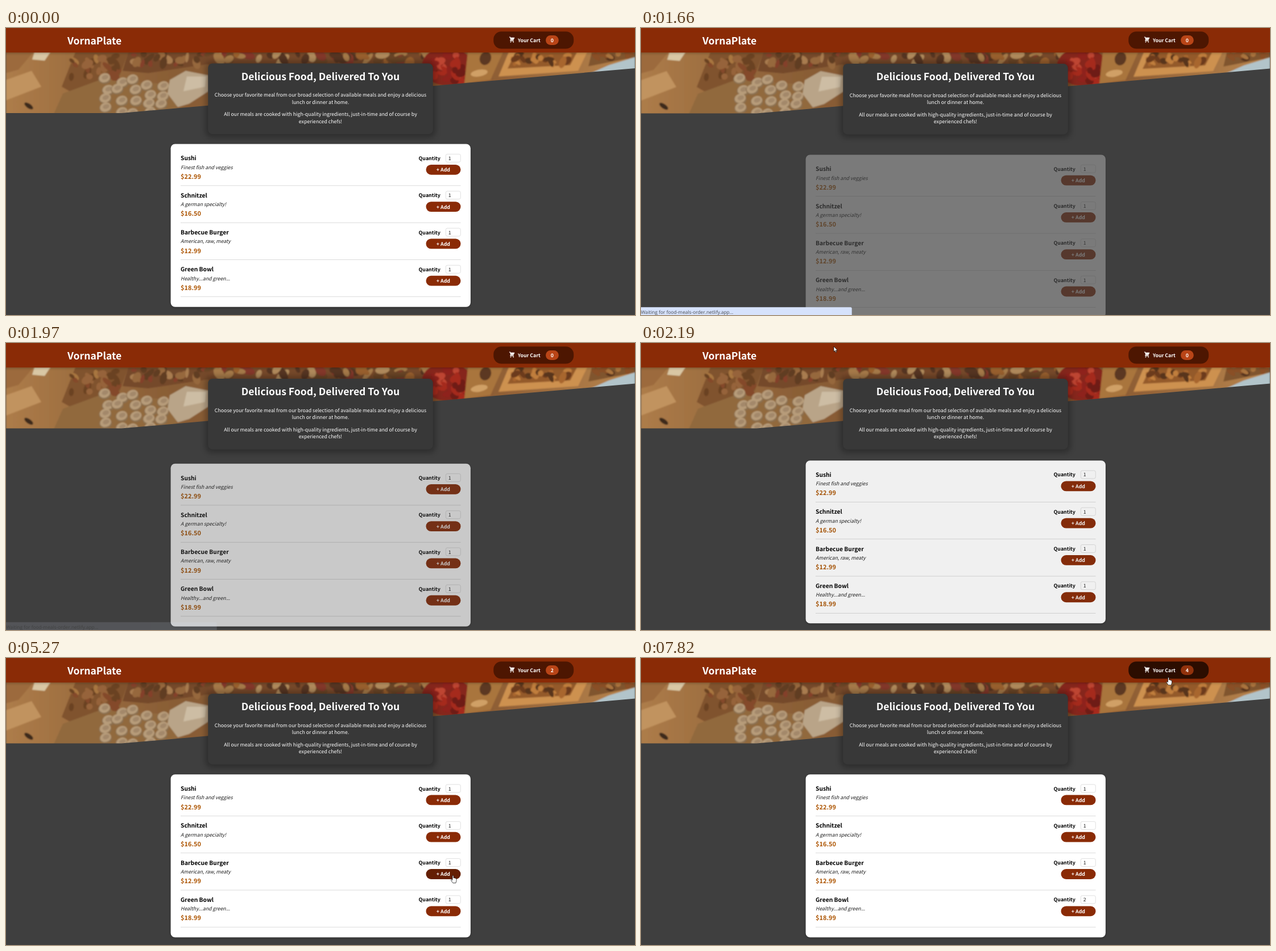
These frames come from a looping animation (1106x506 px, 8000 ms). An HTML page:

```html
<!DOCTYPE html>
<html lang="en">
<head>
<meta charset="utf-8">
<title>Meal order</title>
<style>
  html, body { margin: 0; width: 100%; height: 100%; overflow: hidden; background: #3f3f3f; }
  svg { display: block; width: 1106px; height: 506px; }
  text {
    font: 8.78px "Noto Sans CJK JP", "Noto Sans JP", "Noto Sans CJK SC", "Noto Sans CJK", sans-serif;
    text-rendering: geometricPrecision;
    white-space: pre;
  }
  .bold { font-weight: 700; }
  .big { font-weight: 700; font-size: 17.56px; }
  .name { font-weight: 700; font-size: 10.27px; }
  .note { font-style: italic; }
  .price { font-weight: 700; font-size: 10.97px; fill: #ad5502; }
  .mid { text-anchor: middle; }
  .light { fill: #fff; }
  .status { font: 8.35px "Open Sans", "Noto Sans", sans-serif; fill: #474a50; }
</style>
</head>
<body>
<svg id="stage" viewBox="0 0 1106 506"></svg>
<script>
const LOOP = 8000;
const RELOAD = 1490;
const $ = id => document.getElementById(id);
const set = (id, attrs) => { for (const k in attrs) $(id).setAttribute(k, attrs[k]); };
const show = (id, on) => $(id).setAttribute('visibility', on ? 'visible' : 'hidden');

const text = (x, y, cls, str, extra = '') => `<text x="${x}" y="${y}" class="${cls}" ${extra}>${str}</text>`;
const rect = (x, y, w, h, r, fill, extra = '') =>
  `<rect x="${x}" y="${y}" width="${w}" height="${h}" rx="${r}" fill="${fill}" ${extra}/>`;
const oval = (x, y, rx, ry, fill, turn = 0) =>
  `<ellipse cx="${x}" cy="${y}" rx="${rx}" ry="${ry}" fill="${fill}" transform="rotate(${turn} ${x} ${y})"/>`;
const poly = (points, fill) => `<polygon points="${points}" fill="${fill}"/>`;

// Buffet photo as soft flat shapes.
function buffet() {
  let seed = 7;
  const rnd = () => (seed = seed * 16807 % 2147483647) / 2147483647;
  const scatter = (n, x, y, w, h, r, colors) => Array.from({ length: n }, () =>
    oval(x + rnd() * w, y + rnd() * h, r * (.6 + rnd()), r * (.4 + rnd() * .6),
      colors[Math.floor(rnd() * colors.length)], rnd() * 180)).join('');
  const cup = (x, y) => oval(x, y + 2, 11, 9, '#8b6f50') + oval(x, y, 10, 8, '#b79c7a', -20)
    + oval(x + 1, y - 1, 6, 4, '#a3886a', -20);
  return rect(0, 40, 1106, 115, 0, 'url(#wood)')
    + poly('0,43 48,43 22,74 0,80', '#9c6b3e')
    + poly('0,92 45,76 62,104 0,128', '#c1935f')
    + poly('50,43 78,43 68,58 46,56', '#d9c7a4')
    + poly('122,43 215,43 200,84 112,112 98,104', '#80522d')
    + scatter(22, 115, 48, 85, 42, 8, ['#96643a', '#a8763f', '#6b4224', '#84492a'])
    + poly('215,43 356,43 356,64 250,80 205,76', '#75482a')
    + scatter(24, 220, 45, 130, 20, 7, ['#84402a', '#a87c50', '#603c24', '#96673c'])
    + poly('100,116 165,92 300,100 300,152 84,152', '#91693e')
    + Array.from({ length: 20 }, (_, i) =>
        cup(168 + i % 5 * 25 + rnd() * 12, 84 + Math.floor(i / 5) * 18 + i % 5 * 3 + rnd() * 9)).join('')
    + poly('288,92 316,76 356,84 356,112 322,134 302,140 284,116', '#b9a488')
    + poly('318,86 352,86 350,104 312,112', '#cdbda4')
    + oval(40, 138, 9, 4, '#3d2a1c', 35)
    + rect(356, 43, 394, 24, 0, '#77492a')
    + scatter(50, 356, 44, 394, 18, 9, ['#a67a4a', '#84392a', '#563622', '#b08a5c', '#6a4428', '#99602f'])
    + oval(775, 68, 44, 34, '#86261a')
    + scatter(26, 750, 48, 52, 48, 8, ['#a52a1e', '#8e241a', '#bd4431', '#6e1c14'])
    + poly('812,43 874,43 852,92 806,98', '#a9743c')
    + oval(843, 54, 10, 12, '#5c3820', 20) + oval(832, 80, 15, 6, '#d0a066', -10)
    + poly('884,43 1022,43 1006,76 866,86', '#cd9150')
    + poly('896,43 1004,43 992,66 882,72', '#945a2a')
    + scatter(24, 892, 47, 98, 17, 7, ['#c07e3c', '#6c3a1e', '#a8662f', '#58341e'])
    + poly('1030,43 1106,43 1106,52 1024,68', '#80542e')
    + scatter(9, 1035, 45, 65, 8, 6, ['#aa733c', '#8a4f28', '#55331e'])
    + poly('1060,66 1106,52 1106,78 1020,84', '#b2c4ca');
}

const menu = [
  ['Sushi', 'Finest fish and veggies', '$22.99'],
  ['Schnitzel', 'A german specialty!', '$16.50'],
  ['Barbecue Burger', 'American, raw, meaty', '$12.99'],
  ['Green Bowl', 'Healthy...and green...', '$18.99'],
];
const rowY = i => i * 65.3;

const row = ([name, note, price], i) => `<g transform="translate(0 ${rowY(i)})">
  ${text(307, 234.1, 'name', name)}
  ${text(307, 249.4, 'note', note, 'fill="#1c1c1c"')}
  ${text(307, 266.5, 'price', price)}
  ${rect(307, 278.2, 492.5, .6, 0, '#c4c4c4')}
  ${text(725.6, 233.5, 'bold', 'Quantity')}
  ${rect(773.3, 223, 26, 14, 2.7, '#fff', `id="field${i}" stroke="#ccc" stroke-width=".6"`)}
  ${text(777.8, 233.5, '', '1', `id="qty${i}" fill="#222"`)}
  <g id="spin${i}">${rect(789.5, 224.5, 8.4, 11, 0, '#ececec')}${rect(789.5, 224.5, 8.4, 5.5, 0, '#d2d2d2')}
    <path d="M791.7 228.6l2-2 2 2zM791.7 232l2 2 2-2z" fill="#555"/></g>
  ${rect(738.5, 241.5, 61, 17.8, 8.9, '#8a2b06', `id="add${i}"`)}
  ${text(768.9, 253.9, 'bold light mid', '+ Add')}</g>`;

$('stage').innerHTML = `
<defs>
  <linearGradient id="wood">
    <stop offset="0" stop-color="#ad7c49"/><stop offset=".25" stop-color="#8a5e36"/>
    <stop offset=".7" stop-color="#80502c"/><stop offset="1" stop-color="#b9864e"/>
  </linearGradient>
  <clipPath id="slant"><path d="M0 40H1106V71.6L203 150.6H0Z"/></clipPath>
  <filter id="soft"><feGaussianBlur stdDeviation="1.3"/></filter>
  <filter id="glow" x="-20%" y="-40%" width="140%" height="180%"><feGaussianBlur stdDeviation="4.9"/></filter>
  <filter id="shade" x="-5%" y="-50%" width="110%" height="200%"><feGaussianBlur stdDeviation="2.2"/></filter>
</defs>
<rect width="1106" height="506" fill="#3f3f3f"/>
<g id="page">
  <g clip-path="url(#slant)"><g filter="url(#soft)">${buffet()}</g></g>
  ${rect(350, 58, 406, 136, 12, '#000', 'opacity=".25" filter="url(#glow)"')}
  ${rect(355.3, 63, 395.4, 124.6, 7.7, '#383838')}
  ${text(553, 92.2, 'big light mid', 'Delicious Food, Delivered To You')}
  ${text(553, 121.9, 'light mid', 'Choose your favorite meal from our broad selection of available meals and enjoy a delicious')}
  ${text(553, 134.3, 'light mid', 'lunch or dinner at home.')}
  ${text(553, 155.8, 'light mid', 'All our meals are cooked with high-quality ingredients, just-in-time and of course by')}
  ${text(553, 168.2, 'light mid', 'experienced chefs!')}
  <g id="list">
    ${rect(289.6, 206.5, 527.3, 287, 7.7, '#000', 'opacity=".25" filter="url(#shade)"')}
    ${rect(289.6, 205.2, 527.3, 287.2, 7.7, '#fff')}
    ${menu.map(row).join('')}
    ${rect(782.8, 420.8, .6, 10, 0, '#111', 'id="caret"')}
  </g>
</g>
${rect(-10, 2, 1126, 42.5, 0, '#000', 'opacity=".25" filter="url(#shade)"')}
${rect(0, 0, 1106, 43.2, 0, '#8a2b06')}
${text(108, 28.9, 'big light', 'VornaPlate')}
<g id="cart">
  ${rect(857.2, 6.3, 141, 30.1, 13.7, '#4d1601', 'id="cartBack"')}
  <path transform="translate(883.6 14.9) scale(.593)" fill="#fff" d="M3 1a1 1 0 000 2h1.22l1.673 6.694-.893.892C3.74 11.846 4.632 14 6.414 14H15a1 1 0 000-2H6.414l1-1H14a1 1 0 00.894-.553l3-6A1 1 0 0017 3H6.28l-.31-1.243A1 1 0 005 1H3zM16 16.5a1.5 1.5 0 11-3 0 1.5 1.5 0 013 0zM6.5 18a1.5 1.5 0 100-3 1.5 1.5 0 000 3z"/>
  ${text(899.9, 24.7, 'bold light', 'Your Cart')}
  ${rect(949, 13, 22.8, 16.9, 8.45, '#b94517', 'id="badge"')}
  ${text(960.4, 24.7, 'bold light mid', '0', 'id="count"')}
</g>
<g id="status">
  <path d="M0 492.3H368.5Q370.7 492.3 370.7 494.5V506H0Z" fill="#d6e2fc"/>
  ${text(0, 503.7, 'status', 'Waiting for food-meals-order.netlify.app...')}
</g>
<g id="cursor" fill="#fff" stroke="#000" stroke-width=".7" stroke-linejoin="round">
  <path id="arrow" d="M0 0V9.3L2.1 7.4 3.5 10.7 5 10 3.6 6.9H6.5Z"/>
  <path id="hand" d="M-1 1Q0-.7 1 1V4.6Q2.2 4 2.8 5 4 4.6 4.5 5.6 6 5.2 6 7V9.5L4.9 13.7H-.2L-3.2 9.4Q-4 7.4-2.4 7.6L-1 8.8Z"/>
</g>`;

// CSS ease-out, cubic-bezier(0, 0, .58, 1).
function easeOut(x) {
  let lo = 0, hi = 1;
  for (let i = 0; i < 20; i++) {
    const s = (lo + hi) / 2;
    if (1.74 * (1 - s) * s * s + s ** 3 < x) lo = s; else hi = s;
  }
  return lo * lo * (3 - 2 * lo);
}

// Keys are [time, ...values]; each segment eases out.
function track(keys, t) {
  if (t <= keys[0][0]) return keys[0].slice(1);
  const i = keys.findIndex(k => k[0] > t);
  if (i < 0) return keys.at(-1).slice(1);
  const a = keys[i - 1], b = keys[i], p = easeOut((t - a[0]) / (b[0] - a[0]));
  return a.slice(1).map((v, j) => v + (b[j + 1] - v) * p);
}

const bump = [[0, 1], [30, .9], [90, 1.1], [150, 1.15], [300, 1]];
const orders = [[3636, 1], [5268, 2], [7028, 4]];
const pointer = [
  [2200, 339, 6], [2280, 400, 47], [2910, 782, 256], [3960, 782, 256], [4440, 786, 383],
  [5430, 786, 383], [5920, 792, 426], [6010, 792, 426], [6080, 792, 421],
  [6570, 792, 421], [6870, 784, 449], [7270, 784, 449], [7800, 927.5, 34],
];

const recorded = t => RELOAD + (Math.floor((t - RELOAD) / 80.1 + .28) - .15) * 80.1;

function draw(t) {
  const now = recorded(t), loaded = t >= RELOAD;
  set('page', { transform: `translate(0 ${loaded ? 0 : -.6})` });

  const appear = loaded ? easeOut(Math.min(1, Math.max(0, (now - 1446) / 965))) : 1;
  set('list', { opacity: appear, transform: `translate(0 ${26.3 * (1 - appear)})` });

  show('status', t >= 1140 && t < 2000);
  set('status', { opacity: Math.min(1, Math.max(0, (1990 - now) / 245)) });

  const [x, y] = track(pointer, now), visible = t >= 2185;
  const over = (l, top, w, h) => visible && x > l && x < l + w && y > top && y < top + h;
  const overCart = over(857, 6, 141, 30);
  const focused = t >= 6250 && t < 7030;
  let hand = overCart;
  menu.forEach((_, i) => {
    const overAdd = over(738.5, 241.5 + rowY(i), 61, 17.8);
    hand ||= overAdd;
    set('add' + i, { fill: overAdd ? '#641e03' : '#8a2b06' });
    show('spin' + i, over(773, 223 + rowY(i), 26, 14));
  });
  set('field3', { stroke: focused ? '#111' : '#ccc', 'stroke-width': focused ? 1.3 : .6 });
  $('qty3').textContent = t >= 6250 ? 2 : 1;
  show('caret', focused && t < 6750);

  const [since, count] = orders.findLast(o => t >= o[0]) || [-LOOP, 0];
  const [scale] = track(bump, now - since);
  set('cart', { transform: `translate(927.7 21.4) scale(${scale}) translate(-927.7 -21.4)` });
  set('cartBack', { fill: overCart ? '#2c0d00' : '#4d1601' });
  set('badge', { fill: overCart ? '#92320c' : '#b94517' });
  $('count').textContent = count;

  set('cursor', { transform: `translate(${x} ${y})` });
  show('arrow', visible && !hand);
  show('hand', visible && hand);
}

let start;
function frame(time) {
  start ??= time;
  draw((time - start) % LOOP);
  requestAnimationFrame(frame);
}
draw(0);
requestAnimationFrame(frame);
</script>
</body>
</html>
```
